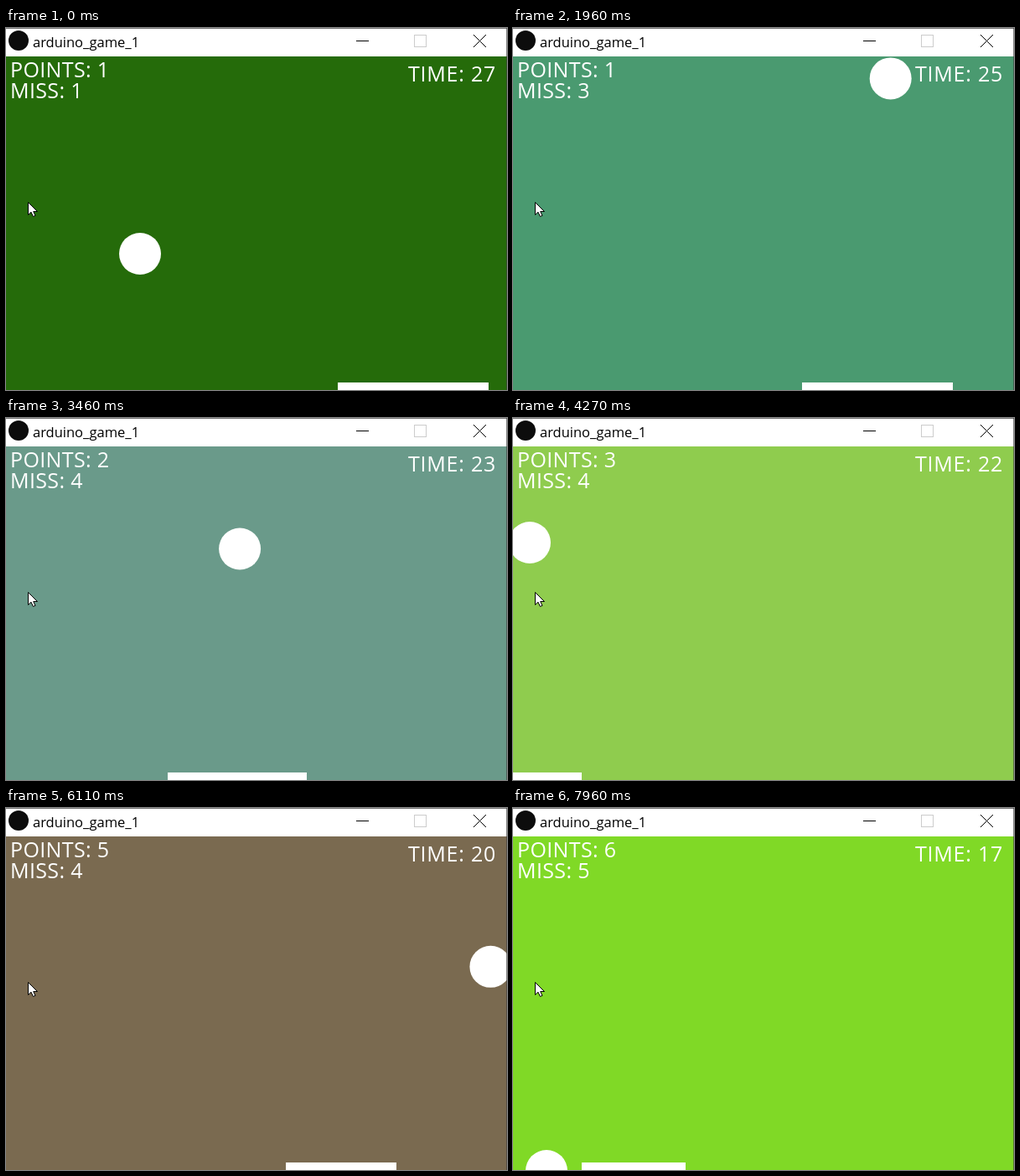
Write an HTML page with a canvas that moves like this. It is 598 px wide and 433 px high and loops after 7990 ms.

```html
<!DOCTYPE html>
<html lang="en">
<head>
<meta charset="utf-8">
<title>arduino_game_1</title>
<style>
  html, body { margin: 0; width: 100%; height: 100%; overflow: hidden; }
  canvas { display: block; }
</style>
</head>
<body>
<canvas id="stage" width="598" height="433"></canvas>
<script>
const ctx = document.getElementById('stage').getContext('2d');
const LOOP = 7990;
const TICK = 30;
const FONT = '"Open Sans", "Noto Sans", sans-serif';

// Turning points of the ball; each row runs between two marks at constant speed.
const MARKS = [0, 1320, 2640, 4270, 5330, 6900, 7960];
const TOP = 54, HIT = 419, MISS = 434;
const ballX = buildTrack([
  [160, 0, 255], [255, 600, 535], [535, 20],
  [20, 0, 335], [335, 600, 375], [375, 40]
]);
const ballY = buildTrack([
  [270, TOP, MISS, TOP, 200],
  [200, MISS, TOP, MISS, 155],
  [155, TOP, HIT, TOP, HIT, 149],
  [149, TOP, HIT, TOP, 189],
  [189, HIT, TOP, MISS, TOP, 170],
  [170, HIT, TOP, MISS]
]);
const landings = ballY.slice(0, -1).filter(([, y]) => y >= HIT);

const paddleX = [
  [0, 486], [1600, 486], [2250, 392], [3170, 392], [3980, 55], [4270, 5], [4400, 5],
  [4780, 150], [5330, 378], [5700, 400], [6300, 400], [6900, 342], [7180, 300], [7960, 144]
];
const PADDLE_WIDTHS = [180, 166, 154, 142, 132, 124];
const BACKGROUNDS = [
  '#256b0a', '#3db0b0', '#4a9a70', '#35e692', '#6a9a8a',
  '#8fcc4e', '#ba6c54', '#7a6a50', '#102110', '#80d926'
];

function buildTrack(legs) {
  const track = legs.flatMap((stops, i) => {
    const travelled = [0];
    for (let k = 1; k < stops.length; k++) {
      travelled.push(travelled[k - 1] + Math.abs(stops[k] - stops[k - 1]));
    }
    const pace = (MARKS[i + 1] - MARKS[i]) / travelled.at(-1);
    return stops.slice(0, -1).map((v, k) => [MARKS[i] + travelled[k] * pace, v]);
  });
  track.push([MARKS.at(-1), legs.at(-1).at(-1)]);
  return track;
}

function valueAt(track, t) {
  const next = track.findIndex(([time]) => time > t);
  if (next < 0) return track.at(-1)[1];
  const [t0, a] = track[next - 1], [t1, b] = track[next];
  return a + (b - a) * (t - t0) / (t1 - t0);
}

function write(text, x, y, size, color, spacing = 0) {
  ctx.font = `${size}px ${FONT}`;
  ctx.letterSpacing = spacing + 'px';
  ctx.fillStyle = color;
  ctx.fillText(text, x, y);
}

function disc(x, y, r, color) {
  ctx.fillStyle = color;
  ctx.beginPath();
  ctx.arc(x, y, r, 0, 2 * Math.PI);
  ctx.fill();
}

function box(x, y, w, h, color) {
  ctx.fillStyle = color;
  ctx.fillRect(x, y, w, h);
}

function drawTitleBar() {
  box(0, 0, 598, 34, '#fff');
  box(0, 0, 598, 1, '#777');
  disc(15, 15, 12, '#0c0c0c');
  write('arduino_game_1', 32, 23, 16.5, '#000');
  box(418, 15, 15, 1, '#000');
  ctx.lineWidth = 1;
  ctx.strokeStyle = '#ccc';
  ctx.strokeRect(487.5, 8.5, 14, 14);
  ctx.strokeStyle = '#000';
  ctx.stroke(new Path2D('M558 8L573 23M573 8L558 23'));
}

function drawCursor() {
  const arrow = new Path2D('M26.5 208.5V223.5L30 220.2L32.4 225.5L35 224.4L32.7 219.5H37.5Z');
  ctx.fillStyle = '#fff';
  ctx.fill(arrow);
  ctx.strokeStyle = '#000';
  ctx.lineWidth = 1;
  ctx.stroke(arrow);
}

function draw(time) {
  const mark = MARKS.findLast(m => m <= time);
  const t = time - (time - mark) % TICK;
  const landed = landings.filter(([at]) => at <= t);
  const missed = landed.filter(([, y]) => y === MISS).length;
  const scored = landed.length - missed;
  const seconds = 27 - Math.max(0, Math.floor((t + 160) / 800));
  const width = PADDLE_WIDTHS[scored];

  box(0, 34, 598, 399, BACKGROUNDS[landed.length]);
  write('POINTS: ' + (1 + scored), 5, 59, 25, '#fff', 0.35);
  write('MISS: ' + (1 + missed), 5, 84, 25, '#fff', 0.35);
  write('TIME: ' + seconds, 480, 64, 25, '#fff', 0.75);
  disc(valueAt(ballX, t), valueAt(ballY, t), 25, '#fff');
  box(Math.round(valueAt(paddleX, t) - width / 2), 424, width, 9, '#fff');
  drawTitleBar();
  box(597, 0, 1, 433, 'rgba(60,60,60,.6)');
  drawCursor();
}

const start = performance.now();
function frame() {
  draw((performance.now() - start) % LOOP);
  requestAnimationFrame(frame);
}
frame();
</script>
</body>
</html>
```
